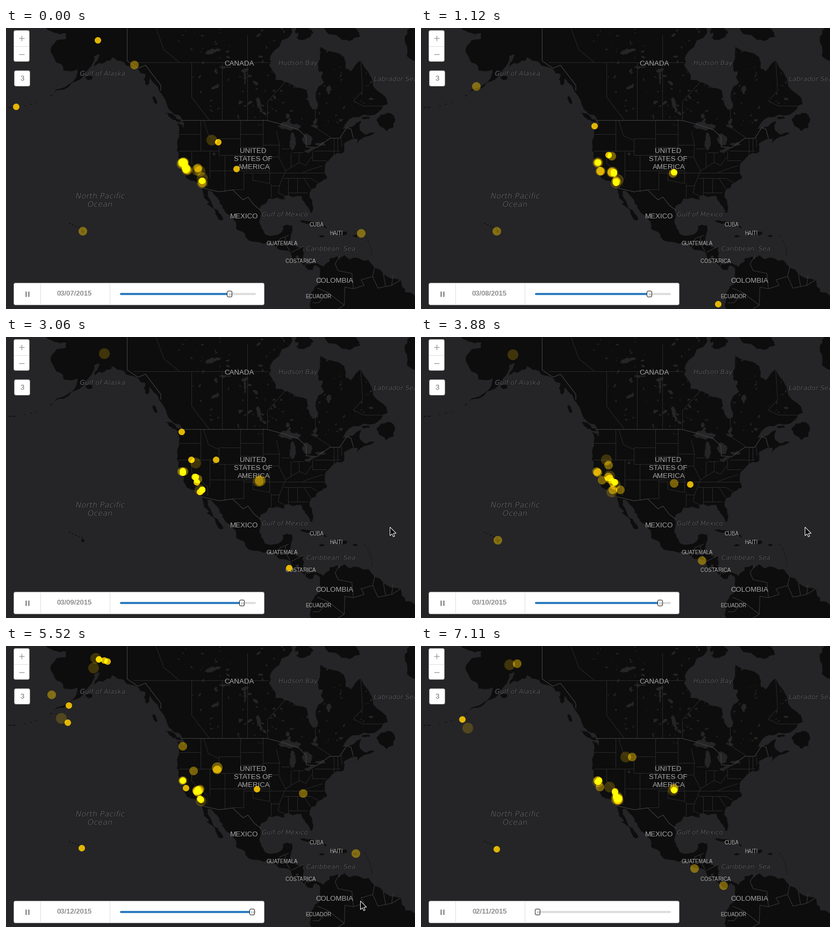
These frames come from a looping animation (761x524 px, 7.21 s). A matplotlib script:

```python
import numpy as np
import matplotlib.pyplot as plt
from matplotlib import patheffects
from matplotlib.animation import FuncAnimation
from matplotlib.collections import LineCollection, PolyCollection
from matplotlib.patches import FancyBboxPatch, Polygon

W, H, DPI = 761, 524, 100
PX = 72 / DPI
LOOP, INTERVAL = 7210, 35
WATER, LAND = "#252527", "#0d0d0d"

fig = plt.figure(figsize=(W / DPI, H / DPI), dpi=DPI, facecolor=WATER)
ax = fig.add_axes((0, 0, 1, 1))
ax.set(xlim=(0, W), ylim=(H, 0))
ax.axis("off")
rng = np.random.default_rng(11)


def project(flat):
    """Web Mercator: flat lon, lat, lon, lat ... to stage pixels."""
    lon, lat = np.reshape(np.asarray(flat, float), (-1, 2)).T
    y = 493 - 325.95 * np.arcsinh(np.tan(np.radians(lat)))
    return np.column_stack([1027.6 + 5.689 * lon, y])


def ragged(points, rounds=2, amount=0.13):
    """Closed outline with its midpoints pushed sideways, like a shore."""
    for _ in range(rounds):
        step = np.roll(points, -1, axis=0) - points
        push = np.clip(rng.normal(0, amount, (len(points), 1)) * step[:, ::-1] * (1, -1), -2.5, 2.5)
        points = np.stack([points, points + step / 2 + push], axis=1).reshape(-1, 2)
    return points


def blob(lon, lat, w, h, tilt=0.0, rounds=0):
    """Uneven oval, size in pixels."""
    a = np.linspace(0, 2 * np.pi, 9)[:-1]
    r = rng.uniform(0.8, 1.15, a.size)
    u, v = r * np.cos(a) * w / 2, r * np.sin(a) * h / 2
    c, s = np.cos(tilt), np.sin(tilt)
    shape = project([lon, lat]) + np.column_stack([u * c - v * s, u * s + v * c])
    return ragged(shape, rounds)


def fill(shapes, color, z):
    ax.add_collection(PolyCollection(shapes, facecolors=color, edgecolors="none", zorder=z))


def borders(lines, color):
    ax.add_collection(LineCollection([project(p) for p in lines], colors=color,
                                     linewidths=PX, zorder=3))


# Key points of the shore, counterclockwise from Bering Strait
pacific = [-168, 65.6, -165, 64.5, -161, 64.4, -161, 63.6, -164.7, 63, -166, 61.6, -164, 59.9,
           -162, 59.3, -161.8, 58.6, -157.2, 58.8, -157.6, 57.6, -160.5, 56, -164.9, 54.6,
           -161, 55.4, -156.5, 57, -153.4, 59, -151.8, 61, -150, 61.2, -151.8, 59.3, -148.2, 60,
           -146, 60.8, -142, 60, -138, 59, -134.5, 57.8, -130.5, 54.9, -128, 52.2, -126, 50.5,
           -123.1, 49.3, -122.3, 47.3, -123, 48.1, -124.7, 48.4, -124, 45.5, -124.5, 42.8,
           -124.3, 40.4, -122.4, 37.5, -120.6, 34.6, -118.4, 33.9, -117.2, 32.6]
tropics = [-115.9, 30.2, -114.2, 28.2, -115, 27.8, -112.2, 25.8, -110.2, 22.9, -109.5, 23.3,
           -111.3, 26, -114.6, 30, -114.7, 31.5, -113.2, 31.2, -110.6, 27.8, -109, 25.5,
           -106.2, 23.1, -105.4, 20.4, -102.3, 17.9, -96.2, 15.7, -94.6, 16.2, -92.2, 14.5,
           -87.5, 13, -85.7, 10.2, -82.8, 8.2, -80.4, 7.3, -79.5, 8.9, -77.9, 7.2, -77.3, 3.9,
           -80, 0.8, -80.9, -2.2, -81.3, -4.4, -81.2, -7, -46, -7, -46, -1, -50, 0, -51.5, 4,
           -57.2, 6, -62, 10.5, -68.2, 10.8, -70, 12.1, -71.4, 11, -71.4, 9.4, -72, 11.7,
           -74.8, 11.1, -76.8, 8.3, -79, 9.5, -82.3, 9.2, -83.6, 10.8, -83.3, 14.8, -88, 15.8,
           -87.1, 21.4, -90.2, 21.1, -90.7, 19.2, -94.4, 18.2, -96.5, 20, -97.8, 22.6, -97.3, 27.3]
atlantic = [-94.7, 29.4, -89.3, 29.1, -89.6, 30.2, -84, 30.1, -82.7, 27.7, -81, 25.2, -80.1, 26.8,
            -81.3, 31, -77.8, 34, -75.6, 35.3, -76.3, 38.5, -74, 40.6, -70, 41.8, -70.2, 43.7,
            -66.9, 44.9, -64.4, 45.5, -66, 43.8, -60, 46.2, -63.5, 46, -65, 47.2, -64.5, 48.9,
            -70.5, 47.1, -67, 49.7, -60, 50.2, -55.8, 52.4, -60.5, 55.8, -64.6, 60.3,
            -67.8, 58.5, -69.5, 58.9, -70, 60.8, -77.8, 62.4, -78.5, 58.8, -76.6, 56.5,
            -79.3, 54.6, -78.8, 51.5, -80.3, 51.3, -82.3, 55.1, -88.5, 56.5, -92.5, 57,
            -94.6, 59.5, -93, 61.8, -87, 64.5, -87, 67]

islands = [(-125.8, 49.6, 31, 8, 0.5), (-132, 53.2, 6, 18, -0.35), (-56.2, 48.9, 32, 34),
           (-79.5, 21.7, 60, 6, 0.25), (-71.4, 19, 32, 9, 0.1), (-71, 64.8, 85, 32, 0.3),
           (-83.5, 64.5, 34, 26), (-46, 63, 50, 60), (-153.5, 57.4, 12, 10), (-155.5, 19.6, 6, 6),
           (-77.3, 18.1, 11, 4), (-66.4, 18.2, 10, 4), (-63, 49.5, 16, 5), (-134.5, 57, 10, 20)]
specks = [(lon, 51.7 + 2.3 * ((lon + 180) / 14) ** 2, rng.uniform(1, 5), 1.3, -0.4)
          for lon in rng.uniform(-180, -165, 12)]
specks += [(-61 - 2.2 * k ** 2, 12 + 6.3 * k, 1.6, 2.2) for k in np.linspace(0, 1, 9)]
specks += [(-155.8 - k, 20.4 + 0.4 * k, 3, 2) for k in range(5)]
fill([ragged(project(pacific + tropics + atlantic))] + [blob(*b, rounds=2) for b in islands]
     + [blob(*b) for b in specks], LAND, 1)

lakes = [(-88, 47.7, 42, 16), (-86.9, 43.9, 11, 36), (-82.2, 44.8, 19, 22),
         (-81.2, 42.2, 25, 6, -0.35), (-77.8, 43.6, 19, 6), (-97.8, 52.3, 9, 30, -0.35),
         (-113.3, 61.7, 32, 9, -0.3), (-109, 59.2, 22, 3), (-102.4, 57.3, 5, 22),
         (-112.6, 41.2, 5, 6), (-85.4, 11.6, 7, 5), (-88.5, 49.9, 7, 10)]
ponds = []
for _ in range(190):
    lat = rng.uniform(47.5, 65.3)
    lon = rng.uniform(-112 - (lat - 48) * 0.9, -60)
    size = rng.uniform(1.2, 4) + 8 * rng.random() ** 6
    ponds.append(blob(lon, lat, size * 1.4, size * 0.7, rng.normal(-0.5, 0.8), rounds=1))
fill([blob(*b, rounds=2) for b in lakes] + ponds, WATER, 2)

# Straight borders: parallels (lat, west, east) and meridians (lon, south, north)
parallels = [(60, -139, -94.8), (46, -124, -117), (42, -124.2, -111), (45, -111, -104),
             (41, -111, -102), (37, -114, -94.6), (40, -102, -95.3), (43, -104, -96.5),
             (45.9, -104, -96.6), (32, -106.6, -103), (33, -94, -91.2), (36.5, -103, -75.9),
             (43.5, -96.5, -91.2), (40.6, -95.8, -91.5), (42.5, -90.6, -87.8), (41.7, -87, -83.4),
             (39.7, -80.5, -75.8), (42, -79.8, -71.4), (35, -90, -81), (31, -88.4, -82)]
meridians = [(-120, 53.8, 60), (-110, 49, 60), (-101.7, 49, 64.2), (-95.2, 49, 52.8),
             (-79.5, 47.5, 51.4), (-120, 39, 42), (-117, 42, 49), (-114, 35, 42), (-111, 41, 45),
             (-109, 31.3, 41), (-104, 41, 49), (-102, 37, 41), (-103, 32, 37), (-100, 34.5, 36.5),
             (-94.5, 33.6, 39), (-94, 29.7, 33.5), (-96.6, 42.5, 49), (-87.5, 38, 41.7),
             (-84.8, 39.1, 41.7), (-80.5, 39.7, 42), (-73.4, 41, 45), (-72.2, 42, 45),
             (-88.3, 30.3, 35), (-85.3, 31, 35)]
rivers = [[-120, 53.8, -114.1, 49], [-95.2, 52.8, -89, 56.8], [-79.5, 47.5, -74.5, 45.2],
          [-124, 60, -129, 62, -132, 65.6], [-57.1, 52, -63.8, 52, -67, 53, -64, 55, -64.6, 60.3],
          [-120, 39, -114.6, 35, -114.7, 32.7], [-116, 49, -114.4, 45.6, -111, 44.5],
          [-100, 34.5, -94.5, 33.6], [-96.5, 42.5, -94.6, 39],
          [-92.2, 46.7, -91.2, 43.5, -91.4, 40.4, -89.2, 37, -91.2, 33, -91.6, 31, -89.6, 30.2],
          [-89.2, 37, -84.8, 39.1, -82.6, 38.4, -80.6, 40.6], [-81, 35, -78.6, 33.9],
          [-83.2, 35, -81, 32.1], [-83.6, 36.5, -80.3, 37.5, -77, 38.3], [-71, 45.3, -70.8, 43]]
borders([[w, lat, e, lat] for lat, w, e in parallels]
        + [[lon, s, lon, n] for lon, s, n in meridians] + rivers, "#292929")
borders([
    [-123.1, 49, -95.2, 49, -89.6, 48, -84.9, 46.9, -82.5, 45.3, -82.4, 43, -79, 42.8,
     -76.5, 44.1, -74.7, 45, -71.5, 45, -69.2, 47.4, -67.8, 47.1, -67, 45],
    [-117.1, 32.5, -111, 31.3, -106.5, 31.8, -103.1, 29, -101.5, 29.8, -99.5, 27.5, -97.2, 25.9],
    [-141, 66, -141, 60.2, -137.5, 59, -135, 59.5, -130, 56, -130, 55],
], "#454545")
borders([
    [-92.2, 14.5, -91, 17.3, -88.2, 18.4], [-89.2, 17.8, -89.2, 15.9, -87.8, 13.4],
    [-87.3, 13, -83.2, 15], [-85.7, 11.1, -83.7, 10.9], [-82.9, 8.2, -82.6, 9.5],
    [-71.7, 18, -71.7, 19.7],
    [-71.5, 11.8, -73, 9.3, -72, 7.1, -67.5, 6.2, -67, 1.2, -69.8, 1.7, -70, -4.2,
     -75.3, -0.1, -78.8, 1.4],
    [-75.3, -0.1, -78.3, -3.4, -80.3, -3.4], [-70, -4.2, -73, -6],
    [-67, 1.2, -63.5, 2.3, -64.5, 4.1, -60.7, 5.2, -60, 8.4],
    [-60.7, 5.2, -59, 1.4, -54.5, 2.3, -51.7, 4], [-57.2, 6, -56.5, 2], [-54, 5.7, -54.5, 2.3],
], "#3a3a3a")


def label(x, y, text, size, color, z=4, **kw):
    font = dict(ha="center", va="baseline", fontfamily="Liberation Sans", zorder=z)
    return ax.text(x, y, text, fontsize=size * PX, color=color, **{**font, **kw})


halo = [patheffects.withStroke(linewidth=1.6 * PX, foreground="#19191b")]
for x, y, name in [(434, 70, "CANADA"), (460, 233, "UNITED"), (460, 248, "STATES OF"),
                   (461, 263, "AMERICA"), (443, 355, "MEXICO"), (611.5, 475, "COLOMBIA")]:
    label(x, y, name, 13.2, "#a8a8a8")
for x, y, name in [(578, 370, "CUBA"), (614, 386, "HAITI"), (513.5, 405, "GUATEMALA"),
                   (548, 438.5, "COSTA\u200aRICA"), (581, 503.5, "ECUADOR")]:
    label(x, y, name, 9.7, "#b4b4b4")
for x, y, name, size in [(175.5, 318, "North Pacific", 14.5), (175, 333.5, "Ocean", 14.5),
                         (180, 89, "Gulf of Alaska", 12.2), (543.5, 69, "Hudson Bay", 12.2),
                         (519, 351.5, "Gulf of Mexico", 12), (604.5, 415.5, "Caribbean  Sea", 12),
                         (725, 99, "Labrador Sea", 12.2)]:
    label(x, y, name, size, "#555557", fontfamily="DejaVu Sans", style="italic",
          path_effects=halo)

# Active regions: x, y, spread, quakes per step
spots = np.array([[329, 251, 1, 1.2], [336, 265, 2, 0.5], [351, 261, 3, 0.7], [358, 270, 2, 1],
                  [363, 287, 3, 1.2], [171, 32, 9, 1.1], [471, 269, 2, 0.5], [333, 185, 5, 0.4],
                  [346, 235, 4, 0.5], [389, 207, 3, 0.25], [388, 231, 4, 0.2], [100, 122, 18, 0.1]])
# Lone quakes far from them: step, x, y
lone = [(-1, 143, 379), (-1, 661, 383), (-1, 239, 69), (0, 19, 147), (0, 429, 263),
        (12, 141, 379), (13, 553, 515), (24, 651, 377), (24, 223, 57), (35, 527, 431),
        (43, 143, 379), (43, 523, 417), (44, 501, 275), (55, 535, 431), (62, 553, 275),
        (62, 651, 387), (63, 141, 377), (72, 143, 379), (80, 509, 415), (80, 563, 447),
        (81, 77, 137), (81, 141, 379)]
events = {}
for s in range(-2, 82):
    x, y, spread, _ = np.repeat(spots, rng.poisson(spots[:, 3]), axis=0).T
    pos = np.column_stack([x, y]) + rng.normal(size=(len(x), 2)) * spread[:, None]
    grid = np.maximum(pos // 2 * 2 + 1, 1).astype(int)
    events[s] = [*grid, *[(x, y) for step, x, y in lone if step == s]]

STAGES = [(6, 0.88), (8, 0.44), (10, 0.21)]  # radius, opacity by age in steps
rows, cols = np.mgrid[:H, :W] + 0.5


def glow(step):
    """Dots added as light: stacked ones turn from amber to yellow."""
    light = np.zeros((H, W))
    for age, (radius, alpha) in enumerate(STAGES):
        for x, y in events.get(step - age, ()):
            box = np.s_[max(y - 12, 0):y + 12, max(x - 12, 0):x + 12]
            dist = np.hypot(cols[box] - x, rows[box] - y)
            light[box] += alpha * np.clip(radius + 0.5 - dist, 0, 1)
    rgba = np.zeros((H, W, 4), np.uint8)
    rgba[..., 0] = 255
    rgba[..., 1] = 255 * np.minimum(0.8 * np.maximum(light, 1), 1)
    rgba[..., 3] = 255 * np.minimum(light, 1)
    return rgba


dots = ax.imshow(np.zeros((H, W, 4), np.uint8), extent=(0, W, H, 0), interpolation="nearest",
                 aspect="auto", zorder=5)


# Controls
def panel(x, y, w, h, edge="#999999", z=6, radius=3.5):
    style = f"round,pad=0,rounding_size={radius}"
    return ax.add_patch(FancyBboxPatch((x, y), w, h, boxstyle=style, facecolor="white",
                                       edgecolor=edge, linewidth=PX, zorder=z))


def stroke(xs, ys, color, width, z=7, cap="butt"):
    return ax.plot(xs, ys, color=color, lw=width * PX, zorder=z, solid_capstyle=cap)[0]


panel(14.5, 4.5, 29, 58)
panel(15.5, 79.5, 29, 29)
panel(14.5, 475.5, 466, 41)
stroke([15, 43], [33.5, 33.5], "#dddddd", 1)
stroke([29, 29], [14, 24], "#999999", 1.3)
for y in (19, 48.5):
    stroke([24, 34], [y, y], "#999999", 1.3)
label(30, 97.5, "3", 13, "#666666", z=7)
for x in (63.5, 192.5):
    stroke([x, x], [476, 516], "#dddddd", 1)
for x in (37, 42):
    stroke([x, x], [491, 501], "#999999", 3)
date = label(127.5, 499, "", 13, "#8e8e8e", z=7, weight="bold")
X0, SPAN = 212, 253
stroke([X0 + 2, X0 + SPAN - 2], [496, 496], "#dddddd", 4, cap="round")
done = stroke([X0 + 2, X0 + 2], [496, 496], "#2e7cbf", 4, z=8, cap="round")
knob = panel(X0, 490.5, 9, 11, edge="#222222", z=9, radius=2.5)
grips = [stroke([0, 0], [493.5, 498.5], "#888888", 1, z=10) for _ in range(2)]

ARROW = np.array([[0, 0], [0, 16], [3.7, 12.6], [6.2, 18], [8.6, 17], [6.2, 11.6], [11.4, 11.6]])
cursor = ax.add_patch(Polygon(ARROW, facecolor="black", edgecolor="white", linewidth=PX, zorder=11))

# First change, last change and count of each run of steps
RUNS = [(50, 770, 9), (860, 1550, 9), (1640, 2360, 9), (2450, 3150, 9), (3240, 3880, 8),
        (3970, 4630, 9), (4720, 5430, 9), (5520, 6240, 9), (6330, 7020, 9), (7110, 7110, 1)]
ticks = np.concatenate([np.linspace(*r) for r in RUNS])


def update(frame):
    step = int(np.searchsorted(ticks, frame * INTERVAL + 30, "right"))
    now = ticks[step - 1] if step else 0
    dots.set_data(glow(step))

    run = (204.36 + 0.6652 * step) % SPAN
    x = X0 + int(run)
    done.set_xdata([X0 + 2, max(x - 2, X0 + 2)])
    knob.set_x(x - 4.5)
    for grip, dx in zip(grips, (-1.5, 1.5)):
        grip.set_xdata([x + dx, x + dx])
    day = int(run / SPAN * 30) + 11
    date.set_text(f"02/{day:02d}/2015" if day <= 28 else f"03/{day - 28:02d}/2015")

    cx = np.interp(now, [1210, 1500, 4830, 5300], [763, 714, 714, 659])
    cy = np.interp(now, [1210, 1500, 4830, 5300, 5540, 5900], [535, 354, 354, 475, 475, 545])
    cursor.set_xy(ARROW + (cx + 0.5, cy + 0.5))
    return dots, done, knob, date, cursor, *grips


anim = FuncAnimation(fig, update, frames=LOOP // INTERVAL, interval=INTERVAL,
                     repeat=True, repeat_delay=0, blit=False)
plt.show()
```
